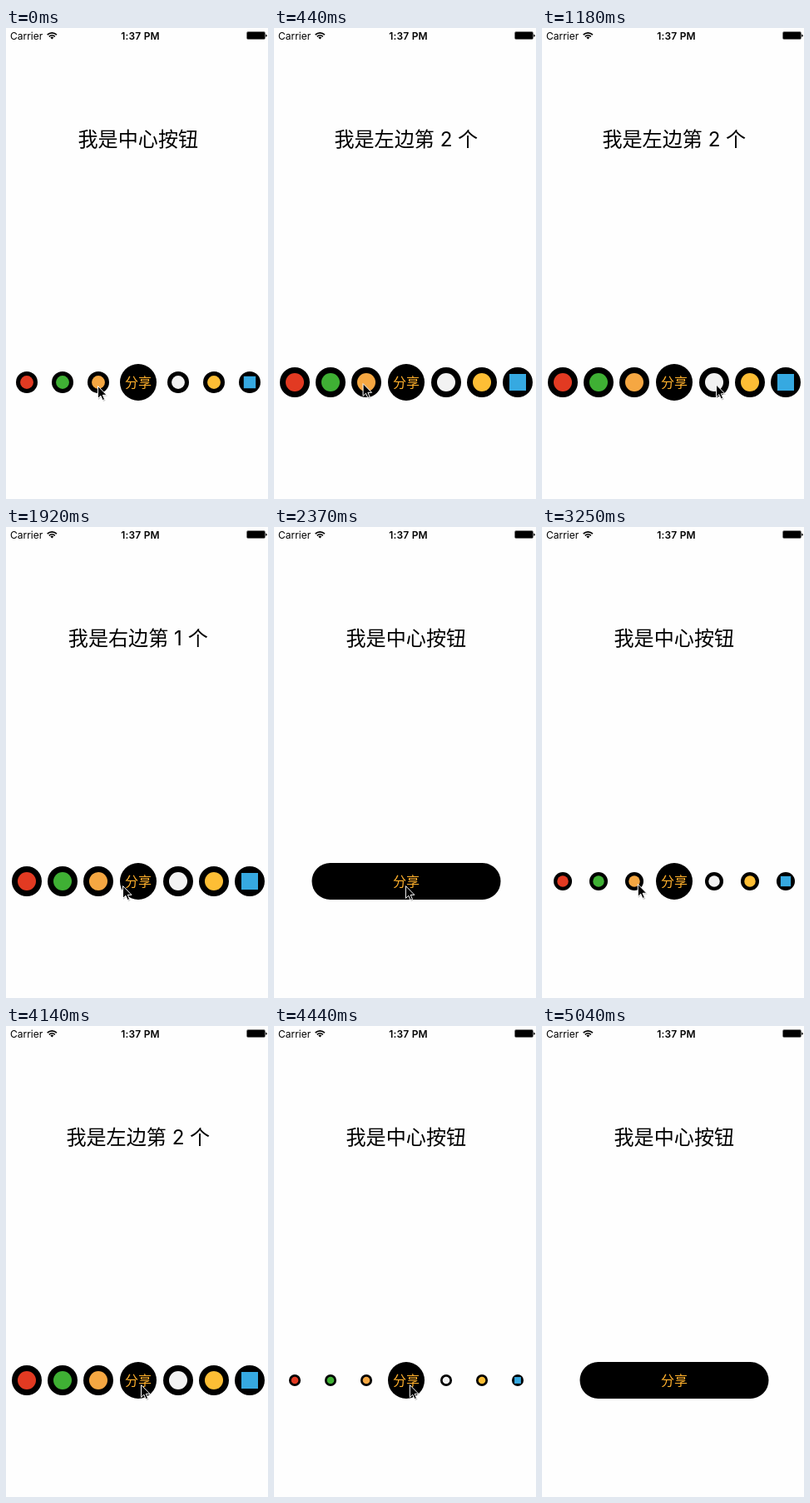
Animation of 315 by 565 pixels, one loop 5.33 s. Source, as an HTML page:

```html
<!DOCTYPE html>
<html lang="zh-CN">
<head>
<meta charset="utf-8">
<title>分享</title>
<style>
  html, body { margin: 0; width: 100%; height: 100%; overflow: hidden; background: #fefefe; }
  svg { display: block; }
  text { font-family: Inter, "Noto Sans CJK SC", "Noto Sans CJK", sans-serif; }
  .mid { text-anchor: middle; }
  .status { font-size: 12px; }
  #label { font-size: 24.1px; }
  #share { font-size: 16px; font-weight: 300; fill: #ffb02c; }
</style>
</head>
<body>
<svg width="315" height="565" viewBox="0 0 315 565">
  <text class="status" x="5" y="13.5">Carrier</text>
  <g transform="translate(55.3 13.4)" fill="none" stroke="#000" stroke-width="1.7">
    <path d="M-5.6 -5.2A7.9 7.9 0 0 1 5.6 -5.2M-3.5 -3A5 5 0 0 1 3.5 -3"/>
    <path d="M0 0L-2 -2A2.8 2.8 0 0 1 2 -2Z" fill="#000" stroke="none"/>
  </g>
  <text class="status mid" x="161.5" y="13.5" font-weight="600" letter-spacing=".2">1:37 PM</text>
  <rect x="289.5" y="4.5" width="22" height="9" rx="1.4" fill="none" stroke="#777"/>
  <rect x="290" y="5" width="21" height="8" rx=".6"/>
  <path d="M312.2 7.6q1.5 .3 1.5 1.6t-1.5 1.6z"/>

  <text id="label" class="mid" x="158.8" y="142"></text>
  <g id="icons"></g>
  <path id="pill"/>
  <text id="share" class="mid" x="159" y="430.7">分享</text>
  <g id="cursor">
    <path d="M1 2V17L4.5 13.8L7 19L9.6 18L7.3 12.6H12Z" opacity=".2"/>
    <path d="M.5 .6V15.4L3.9 12.2L6.2 17.5L8.6 16.5L6.3 11.3H11Z" stroke="#fff"/>
  </g>
</svg>
<script>
const LOOP = 5330, STEP = LOOP / 36, CX = 159, CY = 425, R = 22;
const GROW = 485, SHRINK = 200, SQUEEZE = 290;
const el = id => document.getElementById(id);
const clamp = v => Math.min(1, Math.max(0, v));

// The menu opens and closes twice per loop; picks are icon taps
const cycles = [
  { open: -350, close: 2100, picks: [[440, '左边第 2 个'], [1480, '右边第 1 个']] },
  { open: 2960, close: 4320, picks: [[3550, '左边第 2 个']] }
];

// Pointer stops: [ms, x, y]
const stops = [[0, 110, 429], [440, 106, 426], [1480, 250, 428], [1920, 140, 430], [2220, 140, 430],
  [2370, 158, 430], [2810, 158, 430], [3250, 115, 428], [3550, 107, 426], [4140, 162, 430],
  [4500, 163, 430], [4890, 244, 564], [LOOP, 340, 720]];

function pointerAt(t) {
  const i = stops.findIndex(s => s[0] > t);
  const [t0, x0, y0] = stops[i - 1], [t1, x1, y1] = stops[i];
  const p = (t - t0) / (t1 - t0);
  return [x0 + (x1 - x0) * p, y0 + (y1 - y0) * p];
}

function pillWidth(t, { open, close }) {
  if (t < open - SQUEEZE || t > close + SHRINK) return 227;
  // Springs past the circle before settling
  return 2 * R - 15 * Math.sin(Math.PI * clamp((t - open + SQUEEZE) / SQUEEZE));
}

// Fixed corner radius: narrower than its height, the pill becomes a lens
function pillPath(w) {
  const flat = Math.max(0, w / 2 - R);
  const inset = Math.max(0, R - w / 2);
  const h = Math.sqrt(R * R - inset * inset);
  const arc = (x, y) => `A${R} ${R} 0 0 1 ${x} ${y}`;
  return `M${CX - flat} ${CY - h}H${CX + flat}${arc(CX + flat, CY + h)}` +
    `H${CX - flat}${arc(CX - flat, CY - h)}Z`;
}

function labelAt(t, { close, picks }) {
  const pick = t < close && picks.findLast(p => p[0] <= t);
  return '我是' + (pick ? pick[1] : '中心按钮');
}

const colors = ['#e23a22', '#3fb034', '#f5a742', '#f2f2f2', '#fdbe35', '#36a9e1'];
el('icons').innerHTML = colors.map((color, i) => `<g><circle r="18"/>` +
  (i === 5 ? `<rect x="-10" y="-10" width="20" height="20" fill="${color}"/>`
           : `<circle r="11" fill="${color}"/>`) + '</g>').join('');
const icons = [...el('icons').children];
const iconX = i => CX + (i < 3 ? -48 - 43 * (2 - i) : 48 + 43 * (i - 3));

function draw(now) {
  // The picture advances in even steps
  const t = Math.floor((now % LOOP + 12) / STEP) * STEP % LOOP;
  const cycle = t < cycles[1].open - 2 * SQUEEZE ? cycles[0] : cycles[1];
  const scale = clamp((t - cycle.open) / GROW) * clamp(1 - (t - cycle.close) / SHRINK);
  icons.forEach((g, i) => {
    g.setAttribute('transform', `translate(${iconX(i)} ${CY}) scale(${scale})`);
  });
  el('pill').setAttribute('d', pillPath(pillWidth(t, cycle)));
  el('label').textContent = labelAt(t, cycle);
  el('cursor').setAttribute('transform', `translate(${pointerAt(t).join(' ')})`);
}

const start = performance.now();
function frame() {
  draw(performance.now() - start);
  requestAnimationFrame(frame);
}
frame();
</script>
</body>
</html>
```
